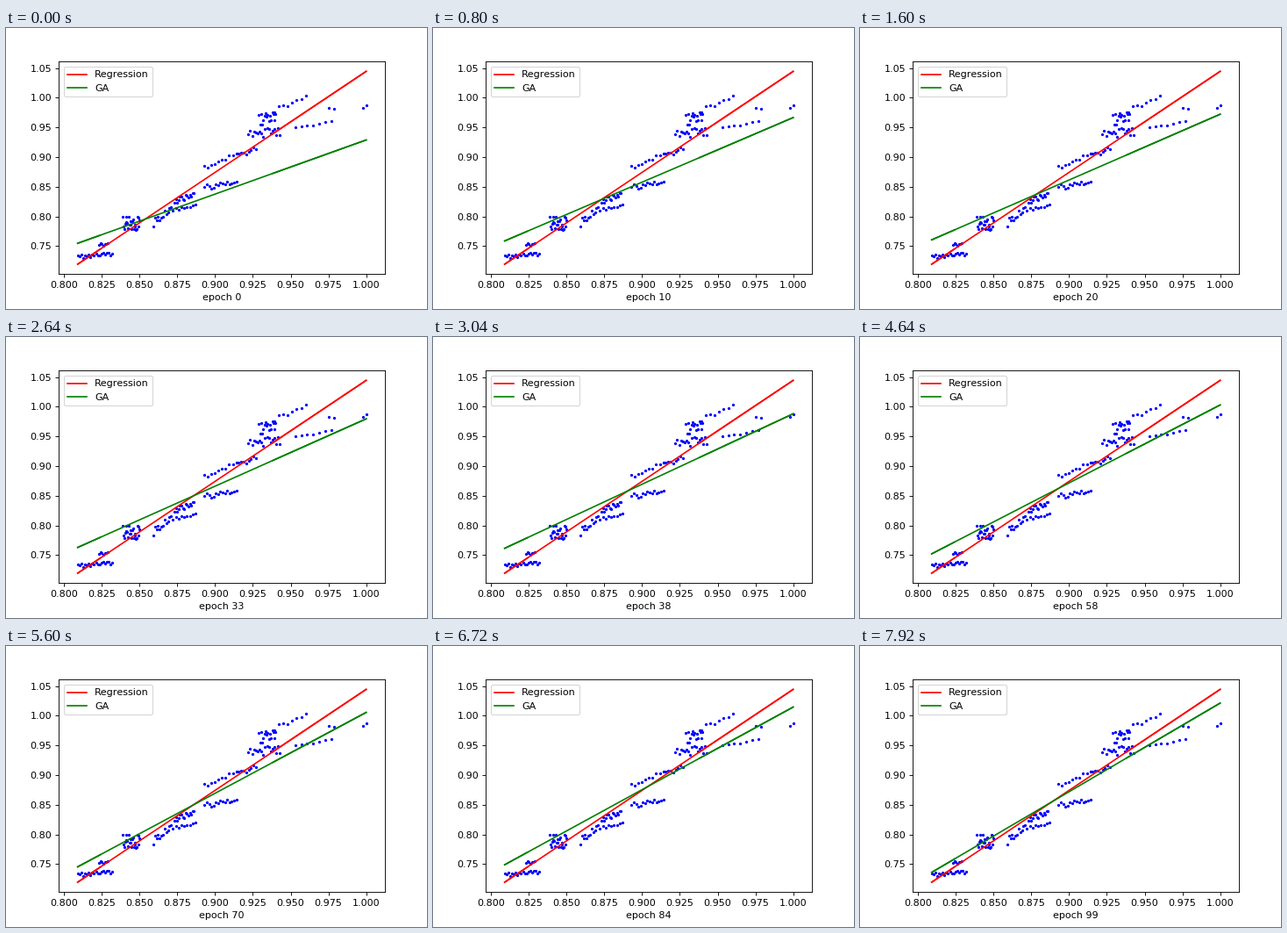
Write a matplotlib script that moves like this. It is 480 by 320 pixels and loops after 8000 ms.

```python
import numpy as np
import matplotlib.pyplot as plt
from matplotlib.animation import FuncAnimation

EPOCHS = 100
X_ENDS = (0.809, 1.0)
REGRESSION_ENDS = (0.7196, 1.0443)

# Clouds of samples: count, start, end, vertical spread
CLOUDS = [
    (20, (0.809, 0.732), (0.832, 0.737), 0.003),
    (7, (0.823, 0.751), (0.829, 0.755), 0.004),
    (24, (0.839, 0.787), (0.850, 0.787), 0.014),
    (13, (0.859, 0.790), (0.872, 0.812), 0.007),
    (15, (0.873, 0.825), (0.886, 0.839), 0.005),
    (8, (0.874, 0.813), (0.887, 0.819), 0.004),
    (10, (0.893, 0.884), (0.914, 0.906), 0.004),
    (15, (0.893, 0.849), (0.914, 0.860), 0.005),
    (9, (0.914, 0.902), (0.927, 0.915), 0.004),
    (18, (0.922, 0.938), (0.943, 0.944), 0.008),
    (16, (0.929, 0.960), (0.940, 0.966), 0.012),
    (8, (0.939, 0.979), (0.960, 0.999), 0.005),
    (7, (0.953, 0.951), (0.977, 0.959), 0.003),
    (2, (0.975, 0.983), (0.979, 0.981), 0.001),
    (2, (0.998, 0.983), (1.000, 0.987), 0.000),
]

# Key poses of the searched line: epoch, left value, right value
KEY_FITS = [
    (0, 0.7548, 0.9288), (10, 0.7588, 0.9665), (33, 0.7630, 0.9795),
    (45, 0.7595, 1.0000), (70, 0.7455, 1.0055), (84, 0.7490, 1.0145),
    (99, 0.7362, 1.0212),
]


def make_points():
    rng = np.random.default_rng(4)
    parts = []
    for count, start, end, spread in CLOUDS:
        part = np.linspace(start, end, count)
        part[:, 1] += rng.uniform(-spread, spread, count)
        parts.append(part)
    return np.vstack(parts).T


def make_line(color, label):
    """A line whose two ends are retraced and so look a little heavier."""
    left, right = X_ENDS
    spans = {label: X_ENDS, "_low": (left, 0.824), "_high": (0.938, right)}
    return [ax.plot(span, span, color=color, label=name)[0]
            for name, span in spans.items()]


def set_line(parts, ends):
    for part in parts:
        part.set_ydata(np.interp(part.get_xdata(), X_ENDS, ends))


plt.rcParams["text.kerning_factor"] = 6
fig = plt.figure(figsize=(6, 4), dpi=80, facecolor="white")
fig.subplots_adjust(left=0.125, right=0.9, bottom=0.125, top=0.88)
ax = fig.add_subplot()
ax.scatter(*make_points(), s=2, c="blue", linewidths=1.5)
set_line(make_line("red", "Regression"), REGRESSION_ENDS)
search = make_line("green", "GA")
ax.set(xlim=(0.7964, 1.0124), ylim=(0.70335, 1.06053))
ax.legend(loc="upper left")


def update(epoch):
    times, *ends = zip(*KEY_FITS)
    set_line(search, [np.interp(epoch, times, values) for values in ends])
    ax.set_xlabel(f"epoch {epoch}")
    return search


anim = FuncAnimation(fig, update, frames=EPOCHS, interval=80,
                     repeat=True, repeat_delay=0, blit=False)
plt.show()
```
